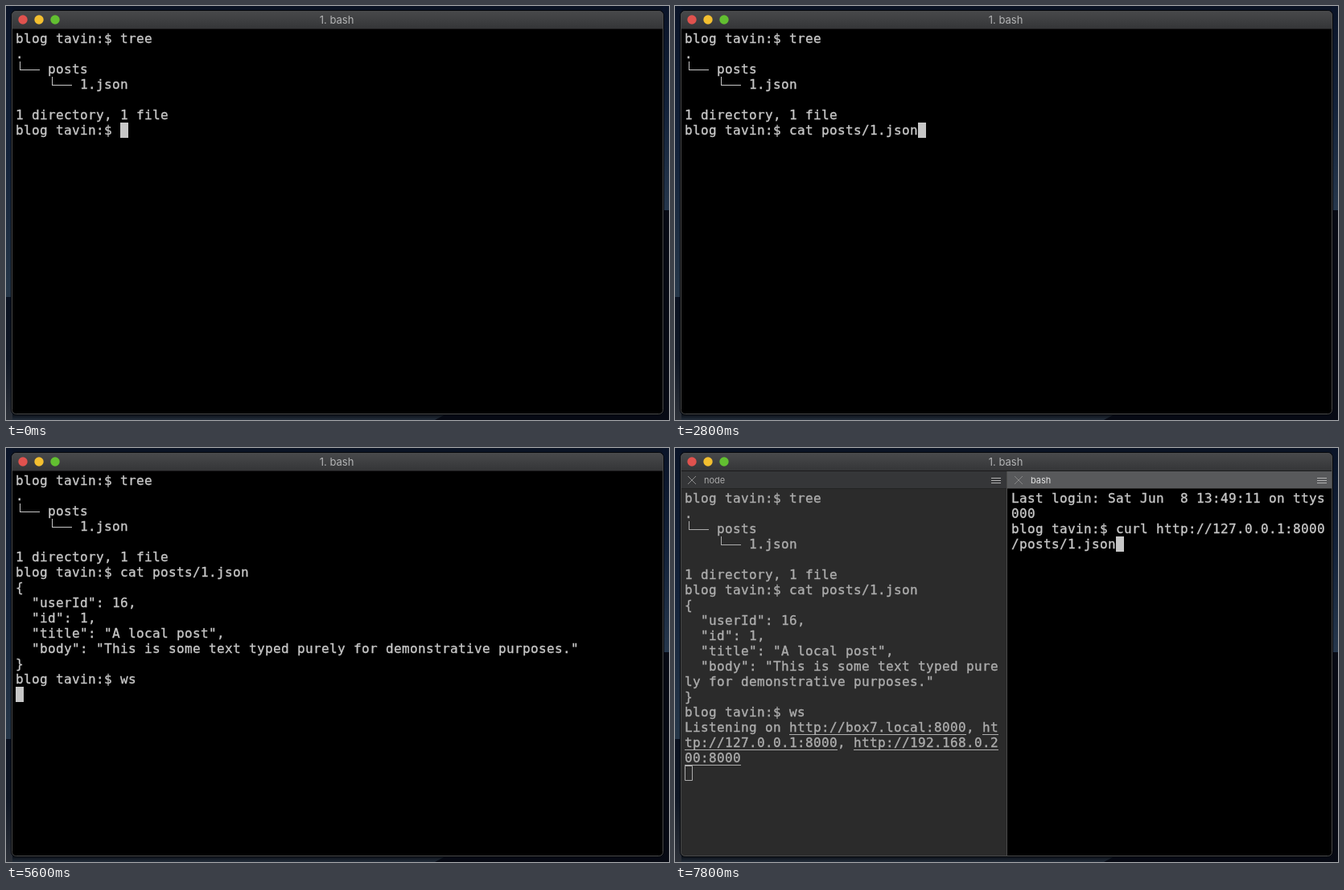
An HTML page with a canvas for the animation above (8 s loop, 824x515 px).

```html
<!DOCTYPE html>
<html lang="en">
<head>
<meta charset="utf-8">
<title>Terminal</title>
<style>
  html, body { margin: 0; width: 824px; height: 515px; overflow: hidden; background: #0b1220; }
  canvas { display: block; }
</style>
</head>
<body>
<canvas width="824" height="515"></canvas>
<script>
const ctx = document.querySelector('canvas').getContext('2d');
const LOOP = 8000, CELL = 10, ROW = 19;
const MONO = '16px "DejaVu Sans Mono", monospace';
const UI = 'Inter, Roboto, sans-serif';

const PROMPT = 'blog tavin:$ ';
const TREE = PROMPT + 'tree\n.\n└── posts\n    └── 1.json\n\n1 directory, 1 file\n' + PROMPT;
const POST = TREE + 'cat posts/1.json\n{\n  "userId": 16,\n  "id": 1,\n  "title": "A local post",\n' +
  '  "body": "This is some text typed purely for demonstrative purposes."\n}\n' + PROMPT;
// Square brackets switch underlining on and off
const SERVE = POST + 'ws\nListening on [http://box7.local:8000], [http://127.0.0.1:8000], [http://192.168.0.200:8000]\n';
const LOGIN = 'Last login: Sat Jun  8 13:49:11 on ttys000\n';

const mainSteps = [
  [0, TREE], [1400, TREE + 'c'], [1800, TREE + 'ca'], [2400, TREE + 'cat'],
  [2600, TREE + 'cat po'], [2800, TREE + 'cat posts/1.json'],
  [3200, POST], [5400, POST + 'ws'], [5600, POST + 'ws\n'], [6000, SERVE]
];
const sideSteps = [
  [7200, LOGIN], [7400, LOGIN + PROMPT], [7600, LOGIN + PROMPT + 'curl '],
  [7800, LOGIN + PROMPT + 'curl http://127.0.0.1:8000/posts/1.json']
];
const titleSteps = [[0, '1. bash'], [5800, '1. node'], [7200, '1. Shell'], [7400, '1. bash']];

const at = (steps, t) => steps.filter(([start]) => start <= t).pop()[1];

function rect(x, y, w, h, fill) {
  ctx.fillStyle = fill;
  ctx.fillRect(x, y, w, h);
}

function fade(y0, y1, ...colors) {
  const g = ctx.createLinearGradient(0, y0, 0, y1);
  colors.forEach((color, i) => g.addColorStop(i / (colors.length - 1), color));
  return g;
}

function shape(points, fill) {
  ctx.fillStyle = fill;
  ctx.beginPath();
  points.forEach(([x, y]) => ctx.lineTo(x, y));
  ctx.fill();
}

function outline(x, y, w, h, r, color) {
  ctx.strokeStyle = color;
  ctx.lineWidth = 1;
  ctx.beginPath();
  ctx.roundRect(x + .5, y + .5, w - 1, h - 1, r);
  ctx.stroke();
}

function label(text, x, y, size, color, align = 'left') {
  ctx.font = `${size}px ${UI}`;
  ctx.textAlign = align;
  ctx.fillStyle = color;
  ctx.fillText(text, x, y);
}

function terminal(text, left, top, cols, color, hollow) {
  let col = 0, row = 0, underline = false;
  ctx.font = MONO;
  ctx.textAlign = 'left';
  ctx.fillStyle = ctx.strokeStyle = color;
  ctx.lineWidth = .35; // thin stroke gives the slightly heavy screen type
  for (const ch of text) {
    if (ch === '[' || ch === ']') { underline = ch === '['; continue; }
    if (ch === '\n') { col = 0; row++; continue; }
    if (col === cols) { col = 0; row++; }
    const x = left + col * CELL, y = top + row * ROW;
    if (ch === '└') {
      ctx.fillRect(x + 5, y, 1, 10);
      ctx.fillRect(x + 5, y + 10, 5, 1);
    } else if (ch === '─') {
      ctx.fillRect(x, y + 10, CELL, 1);
    } else {
      ctx.fillText(ch, x, y + 15);
      ctx.strokeText(ch, x, y + 15);
    }
    if (underline) ctx.fillRect(x, y + 18, CELL, 1);
    col++;
  }
  const x = left + col * CELL, y = top + row * ROW;
  if (hollow) outline(x, y, CELL, ROW, 0, color);
  else rect(x, y, CELL, ROW, color);
}

function desktop() {
  rect(0, 0, 824, 515, '#0a1324');
  rect(0, 0, 8, 362, fade(0, 362, '#0a1428', '#13223a', '#263749'));
  rect(816, 0, 8, 254, fade(0, 254, '#0a1428', '#13223a', '#26374c'));
  rect(0, 362, 8, 153, fade(362, 515, '#0a1120', '#0f1725', '#2c3038'));
  rect(816, 254, 8, 261, '#070a14');
  rect(8, 508, 816, 7, fade(508, 515, '#0c1119', '#232d3a'));
  shape([[533, 515], [546, 508], [824, 508], [824, 515]], '#070a14');
}

function frame(title) {
  ctx.save();
  ctx.beginPath();
  ctx.roundRect(7, 6, 810, 502, 5);
  ctx.clip();
  rect(7, 6, 810, 502, '#000');
  rect(7, 6, 810, 23, fade(6, 29, '#48494b', '#343537'));
  rect(7, 28, 810, 1, '#1b1b1c');
  ['#e0524e', '#f3bf30', '#62bf31'].forEach((color, i) => {
    ctx.fillStyle = color;
    ctx.beginPath();
    ctx.arc(21 + i * 20, 17, 5.7, 0, 7);
    ctx.fill();
  });
  label(title, 411, 22, 13, '#b4b5b6', 'center');
}

function tab(name, x, end, bg, color, cross) {
  rect(x, 29, end - x, 21, bg);
  rect(x, 50, end - x, 1, '#232323');
  const cx = x + 14;
  ctx.strokeStyle = cross;
  ctx.lineWidth = 1;
  ctx.beginPath();
  ctx.moveTo(cx - 5, 35); ctx.lineTo(cx + 5, 45);
  ctx.moveTo(cx + 5, 35); ctx.lineTo(cx - 5, 45);
  ctx.stroke();
  label(name, x + 29, 44, 11, color);
  for (let i = 0; i < 3; i++) rect(end - 19, 37 + i * 3, 12, 1, '#b2b2b2');
}

function draw(t) {
  desktop();
  frame(at(titleSteps, t));
  if (t < 7200) {
    terminal(at(mainSteps, t), 12, 31, 80, '#c7c7c7');
  } else {
    rect(7, 29, 405, 479, '#2b2b2b');
    terminal(SERVE, 12, 53, 39, '#adadad', true);
    terminal(at(sideSteps, t), 418, 53, 39, '#c7c7c7');
    tab('node', 7, 412, '#353638', '#a9a9a9', '#8c8c8c');
    tab(t < 7400 ? 'Default' : 'bash', 413, 817, '#58595b', '#e2e2e2', '#868686');
    rect(412, 29, 1, 479, '#4a4a4a');
  }
  ctx.restore();
  outline(6, 5, 812, 504, 6, '#05070b');
  outline(7, 6, 810, 502, 5, '#48494a');
}

const start = performance.now();
function tick() {
  draw((performance.now() - start) % LOOP);
  requestAnimationFrame(tick);
}
tick();
</script>
</body>
</html>
```
